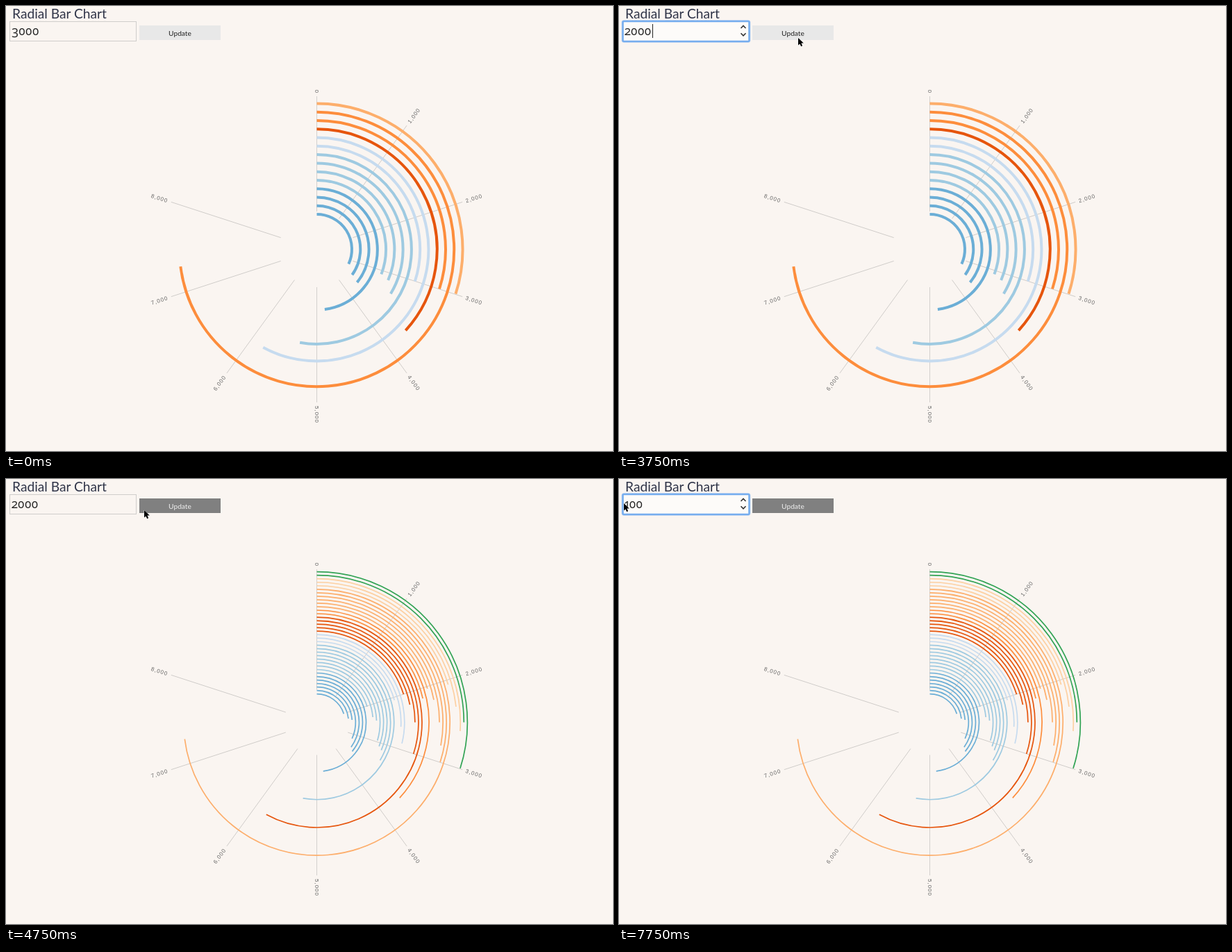
These frames come from a looping animation (874 px wide and 641 px high, 8 s). An HTML page:

```html
<!DOCTYPE html>
<html lang="en">
<head>
<meta charset="utf-8">
<title>Radial Bar Chart</title>
<style>
  html, body { margin: 0; width: 100%; height: 100%; overflow: hidden; background: #faf5f1; }
  svg { display: block; font-family: Lato, sans-serif; fill: #222; }
  .title { font-size: 19.2px; fill: #2f3448; }
  .value { font: 17.4px "Open Sans", sans-serif; font-variant-numeric: oldstyle-nums proportional-nums; }
  .button rect { fill: #e8e8e8; }
  .button text { font-size: 10.2px; text-anchor: middle; }
  .button.hover rect { fill: #808080; }
  .button.hover text { fill: #eee; }
  .box { fill: none; stroke: #cfcdcb; }
  .ring { fill: #fdfbf9; stroke: #76adee; stroke-width: 2.6; }
  .glow { fill: none; stroke: #76adee; stroke-opacity: .3; stroke-width: 4; }
  .spinner { fill: none; stroke: #333; stroke-width: 1.6; }
  .grid line { stroke: #cfccc9; stroke-width: .9; }
  .grid text { font: 8px "Liberation Sans", Arial, sans-serif; letter-spacing: 1px; fill: #666; }
  .bars path { fill: none; }
</style>
</head>
<body>
<svg width="874" height="641" viewBox="0 0 874 641">
  <text class="title" x="9" y="18">Radial Bar Chart</text>
  <g class="button" id="button">
    <rect x="192" y="28" width="117" height="21"/>
    <text x="250.5" y="42.5">Update</text>
  </g>
  <rect class="box" id="box" x="5.5" y="22.5" width="182" height="28"/>
  <g id="focus">
    <rect class="glow" x="5.5" y="22" width="182" height="29" rx="2"/>
    <rect class="ring" x="5.5" y="22" width="182" height="29" rx="1.5"/>
    <path class="spinner" d="M175.5 32l3.5-3.6 3.5 3.6M175.5 39.2l3.5 3.6 3.5-3.6"/>
  </g>
  <rect id="selection" x="8" y="25" width="40" height="21" fill="#b0d4fa"/>
  <text class="value" id="value" x="8" y="42"></text>
  <rect id="caret" y="26" width="1" height="20"/>
  <g transform="translate(447.5 350.5)">
    <g class="grid" id="grid"></g>
    <g class="bars" id="bars3000"></g>
    <g class="bars" id="bars2000"></g>
  </g>
  <path id="cursor" d="M0 0V10.6L2.4 8.4 4.2 12.2 6.1 11.3 4.4 7.6H7.8Z" fill="#000" stroke="#fff" stroke-width=".8" paint-order="stroke"/>
</svg>
<script>
const LOOP = 8000, STEP = 250, FADE_START = 3875, FADE = 1000;
const $ = id => document.getElementById(id);

function add(parent, name, attrs, text = '') {
  const el = document.createElementNS('http://www.w3.org/2000/svg', name);
  for (const key in attrs) el.setAttribute(key, attrs[key]);
  el.textContent = text;
  parent.append(el);
  return el;
}

// Each group is [colour, end angles in degrees], from the centre outwards.
const large = [
  ['#6baed6', [114.8, 125.8, 129.4, 172.5]],
  ['#9ecae1', [111.1, 113.4, 121, 190.3]],
  ['#c6dbef', [108.1, 208.7]],
  ['#e6550d', [132.4]],
  ['#fd8d3c', [107.9, 262.8]],
  ['#fdae6b', [107.8]]
];
const all = [
  ['#6baed6', [72.4, 83.2, 86, 114.8, 125.8, 129.4, 172.5]],
  ['#9ecae1', [72.8, 84.7, 88.3, 106.7, 111.1, 113.4, 121, 190.3]],
  ['#c6dbef', [74, 93, 104]],
  ['#e6550d', [72.1, 79.3, 90, 108.1, 208.7]],
  ['#fd8d3c', [77.3, 132.4]],
  ['#fdae6b', [73.1, 79.1, 90, 100.6, 107.9, 262.8]],
  ['#fdd0a2', [74, 83.6, 93.5]],
  ['#31a354', [90, 107.8]]
];

function drawBars(parent, groups, radius, step, width) {
  for (const [stroke, angles] of groups) {
    for (const angle of angles) {
      const a = angle * Math.PI / 180;
      const x = radius * Math.sin(a), y = -radius * Math.cos(a);
      add(parent, 'path', {
        d: `M0 ${-radius}A${radius} ${radius} 0 ${+(angle > 180)} 1 ${x} ${y}`,
        stroke, 'stroke-width': width
      });
      radius += step;
    }
  }
}
drawBars($('bars3000'), large, 50.5, 12.27, 4);
drawBars($('bars2000'), all, 40.8, 5.03, 1.7);

const spokes = [];
for (let i = 0; i < 9; i++) {
  const angle = i * 36, flip = angle > 180;
  const spoke = add($('grid'), 'g', { transform: `rotate(${angle - 90})` });
  spokes.push(add(spoke, 'line', { x2: 220.5 }));
  add(spoke, 'text', {
    dy: '.35em',
    transform: `translate(225.5)${flip ? 'rotate(180)' : ''}`,
    'text-anchor': flip ? 'end' : 'start'
  }, (i * 1000).toLocaleString('en-US'));
}

// Timelines: [start, ...state]
const pointer = [
  [0], [250, 183, 7], [500, 73, 33], [750, 61, 36], [3250, 84, 43.5], [3500, 199, 45],
  [3750, 258, 46], [4000, 226, 45], [4750, 199, 45], [5000, 98, 27], [5250, 76, 39], [5500], [7750, 7, 35]
];
const typing = [
  [0, '3000'], [2000, '2', 17], [2250, '20', 27], [2500, '200', 37], [2750, '2000', 48],
  [3250, '2000'], [3750, '2000', 48], [4000, '2000'], [5250, '2000', 48], [5500, '2000'],
  [7000, '1', 15], [7250, '100', 36], [7750, '100']
];
const at = (line, t) => line.findLast(entry => entry[0] <= t).slice(1);
const within = (t, from, to) => t >= from && t < to;
const show = (id, on) => $(id).setAttribute('visibility', on ? 'visible' : 'hidden');
const easeCubic = p => p < .5 ? 4 * p ** 3 : 1 - 4 * (1 - p) ** 3;

function render(t) {
  const updated = t >= 4000;
  const focused = within(t, 1000, 4000) || t >= 5250;
  const [x, y] = at(pointer, t);
  const [text, caret] = at(typing, t);

  show('cursor', x !== undefined);
  if (x !== undefined) $('cursor').setAttribute('transform', `translate(${x} ${y})`);

  $('value').textContent = text;
  show('caret', caret !== undefined);
  if (caret !== undefined) $('caret').setAttribute('x', caret);

  show('focus', focused);
  show('box', !focused);
  show('selection', within(t, 1000, 2000) || within(t, 5500, 7000));
  $('button').classList.toggle('hover', updated);

  const fade = Math.min(1, Math.max(0, (t - FADE_START) / FADE));
  show('bars3000', !updated);
  show('bars2000', updated);
  $('bars2000').setAttribute('opacity', easeCubic(fade));
  for (const line of spokes) line.setAttribute('x1', updated ? 47 : 54.5);
}

const start = performance.now();
function tick() {
  const t = (performance.now() - start) % LOOP;
  render(Math.floor(t / STEP) * STEP);
  requestAnimationFrame(tick);
}
tick();
</script>
</body>
</html>
```
